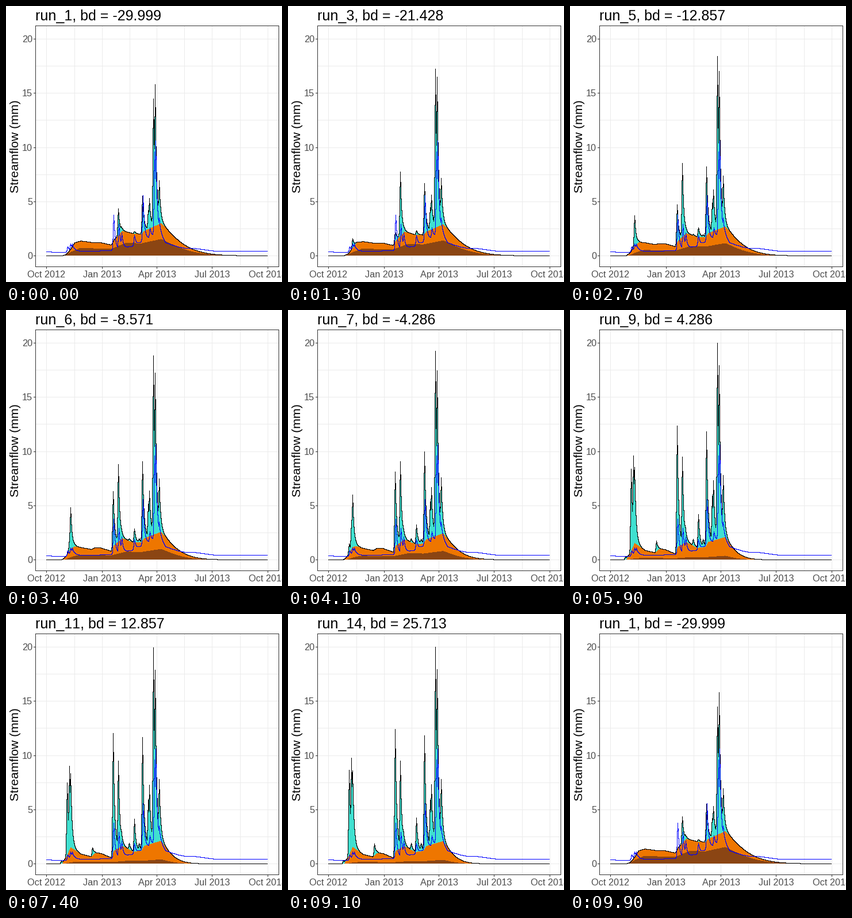
A matplotlib script that plays this animation: 480x480 px, repeating every 10000 ms.

```python
import numpy as np
import matplotlib.pyplot as plt
from matplotlib.animation import FuncAnimation

SIZE, DPI = 480, 80
PX = 72 / DPI
LEFT, RIGHT, TOP, BOTTOM = 51.5, 474.5, 34.5, 453.5
ZERO, PER_MM = 434.5, 18.85
RISE, DECAY = 2.2, 2.5
CREST = 269
STARTS = [4, 11, 18, 25, 32, 39, 46, 52, 59, 66, 74, 80, 85, 91, 97]
STEPS = 3
RUNS = len(STARTS)
BD = np.linspace(-29.999, 29.999, RUNS)

plt.rcParams["font.family"] = "Liberation Sans"
plt.rcParams["text.kerning_factor"] = 6
cols = np.arange(70, 455)

# Stores: column, level in the coldest run, level in a warm run
SOIL = [(97, 0, 0), (104, .12, .6), (112, .6, 1.55), (119, 1.2, 1.3),
        (130, 1.37, .88), (148, 1.24, .65), (154, 1.22, .97), (164, 1.22, .97),
        (183, 1, .55), (187, 1.45, 1.2), (202, 2.3, 1.65), (221, 2.05, 1.1),
        (235, 2, 1.2), (240, 2.3, 1.65), (CREST, 3, 2.1)]
GROUND = [(100, 0, 0), (114, .4, .15), (128, .72, .18), (183, .65, .15),
          (208, 1.2, .25), (235, 1.15, .25), (CREST, 1.55, .38)]

# Storms: column, cold peak, warm peak, power of the response to warmth
STORMS = [(96, 0, .3, 8), (106, 0, 8.2, 6), (110, 0, 9.5, 3.4),
          (112, 0, 8.5, 1.2), (150, 0, 1.7, 8), (186, 1, 12.3, 1.6),
          (195, 4.35, 9.5, .3), (200, 2.7, 3.2, 1), (214, 2.1, 1.9, 1),
          (223, 2.25, 4.2, 2.4), (231, 2, 1.9, 1), (237, 5.5, 11.8, 1.2),
          (247, 4.2, 5.9, 1.3), (249, 5.3, 7.3, 1.3), (256, 14.5, 20, .5),
          (259, 15.8, 17.9, .8), (266, 6.95, 7.8, 1)]

OBSERVED_BASE = [(70, .35), (105, .33), (115, .6), (125, .45), (150, .42),
                 (183, .5), (221, .9), (262, 2), (270, 1.8), (277, 1.2),
                 (297, .85), (310, .7), (325, .7), (360, .45), (454, .4)]
OBSERVED_STORMS = [(107, .85), (112, 1.1), (115, 1.1), (187, 3.75), (196, 2.9),
                   (201, 2.1), (223, 1.9), (238, 5.55), (250, 2.6), (258, 9.6),
                   (260, 10.6), (266, 3.5)]


def mix(a, b, t):
    return a + (b - a) * t


def add_storms(base, storms):
    """Raise a base curve by storms with a steep rise and slow recession."""
    flow = base.copy()
    for at, peak in storms:
        excess = max(0, peak - np.interp(at, cols, base))
        lag = cols - at
        pulse = np.where(lag < 0, np.clip(1 + lag / RISE, 0, 1),
                         np.exp(-np.maximum(lag, 0) / DECAY))
        flow = np.maximum(flow, base + excess * pulse)
    return flow


def store(knots, thaw, tail):
    """A store that fills along its knots and drains after the crest."""
    at, cold, warm = np.array(knots).T
    level = np.interp(cols, at, mix(cold, warm, thaw))
    after = np.maximum(cols - CREST, 0)
    return level * np.exp(-(after / tail) ** 1.27)


def hydrograph(warmth):
    """Rows: groundwater, soil water, total flow."""
    thaw = warmth ** 1.6
    tail = mix(38.4, 20, thaw)
    soil = store(SOIL, thaw, tail)
    ground = store(GROUND, thaw, tail * 1.12)
    storms = [(at, mix(cold, warm, warmth ** power))
              for at, cold, warm, power in STORMS]
    return np.array([ground, soil, add_storms(soil, storms)])


warmth = np.interp(np.arange(1, RUNS + 1), [1, 9, 10, 11, 14, 15],
                   [0, 1, 1.01, .985, .985, 1.05])
runs = [hydrograph(w) for w in warmth]
observed = add_storms(np.interp(cols, *zip(*OBSERVED_BASE)), OBSERVED_STORMS)


def to_y(mm):
    return ZERO - PER_MM * np.asarray(mm)


def columns(top, bottom):
    """Outline of one-pixel columns between two rows of edges."""
    xs = np.column_stack([cols, cols + 1]).ravel()
    upper = np.column_stack([xs, np.repeat(top, 2)])
    lower = np.column_stack([xs, np.repeat(bottom, 2)])
    return np.vstack([upper, lower[::-1]])


def area_shape(mm):
    return columns(np.round(to_y(mm)), np.full(len(cols), np.floor(ZERO)))


def curve_shape(mm):
    """A hard-edged line, one pixel thick."""
    y = to_y(mm)
    edges = np.concatenate([y[:1], (y[:-1] + y[1:]) / 2, y[-1:]])
    spans = np.array([edges[:-1], y, edges[1:]])
    return columns(np.floor(spans.min(0)), np.floor(spans.max(0)) + 1)


fig = plt.figure(figsize=(SIZE / DPI, SIZE / DPI), dpi=DPI, facecolor="white")
ax = fig.add_axes([0, 0, 1, 1])
ax.set(xlim=(0, SIZE), ylim=(SIZE, 0))
ax.axis("off")


def line(xs, ys, color, z):
    ax.plot(xs, ys, color=color, lw=0.4 * PX, aa=False, snap=False, zorder=z)


def shape(outline, color, z):
    return ax.fill(*outline.T, color=color, lw=0, aa=False, snap=False,
                   zorder=z)[0]


def label(px, py, text, size, color="black", **kw):
    return ax.text(px, py, text, fontsize=size * PX, color=color,
                   va="baseline", **kw)


GRID, FRAME, GREY = "#EBEBEB", "#333333", "#4D4D4D"
for mm in np.arange(0, 20.1, 2.5):
    y = np.floor(to_y(mm)) + 0.5
    line([LEFT, RIGHT], [y, y], GRID, 1)
    if mm % 5 == 0:
        line([LEFT - 3, LEFT], [y, y], FRAME, 7)
        label(46, y + 5.5, f"{mm:.0f}", 16.3, GREY, ha="right")

months = ["Oct 2012", "Jan 2013", "Apr 2013", "Jul 2013", "Oct 2013"]
ticks = np.array([70.5, 167.5, 262.5, 358.5, 455.5])
for tick, month in zip(ticks, months):
    line([tick, tick], [TOP, BOTTOM], GRID, 1)
    line([tick, tick], [BOTTOM, BOTTOM + 3], FRAME, 7)
    label(tick, 472, month, 16.3, GREY, ha="center")
for minor in np.floor((ticks[:-1] + ticks[1:]) / 2) + 0.5:
    line([minor, minor], [TOP, BOTTOM], GRID, 1)

line([LEFT, RIGHT, RIGHT, LEFT, LEFT], [TOP, TOP, BOTTOM, BOTTOM, TOP], FRAME, 7)
label(22, 244.5, "Streamflow (mm)", 21.3, ha="center", rotation=90,
      rotation_mode="anchor")
title = label(51, 25, "", 25)

areas = [shape(area_shape(mm), color, z)
         for mm, color, z in zip(runs[0], ("#8B4513", "#EE7600", "#40E0D0"),
                                 (4, 3, 2))]
flow_line = shape(curve_shape(runs[0][2]), "black", 5)
shape(curve_shape(observed), "blue", 6)


def pose(frame):
    """Curves and nearest run for a frame."""
    started = [k for k, start in enumerate(STARTS) if frame >= start]
    if not started:
        return runs[0], 0
    k = started[-1]
    after = (k + 1) % RUNS
    t = min(1, (frame - STARTS[k] + 1) / STEPS)
    return mix(runs[k], runs[after], t), after if t > .5 else k


def update(frame):
    curves, run = pose(frame)
    for patch, mm in zip(areas, curves):
        patch.set_xy(area_shape(mm))
    flow_line.set_xy(curve_shape(curves[2]))
    title.set_text(f"run_{run + 1}, bd = {round(BD[run], 3) + 0:g}")
    return [*areas, flow_line, title]


anim = FuncAnimation(fig, update, frames=100, interval=100, repeat=True,
                     repeat_delay=0, blit=False)
plt.show()
```
